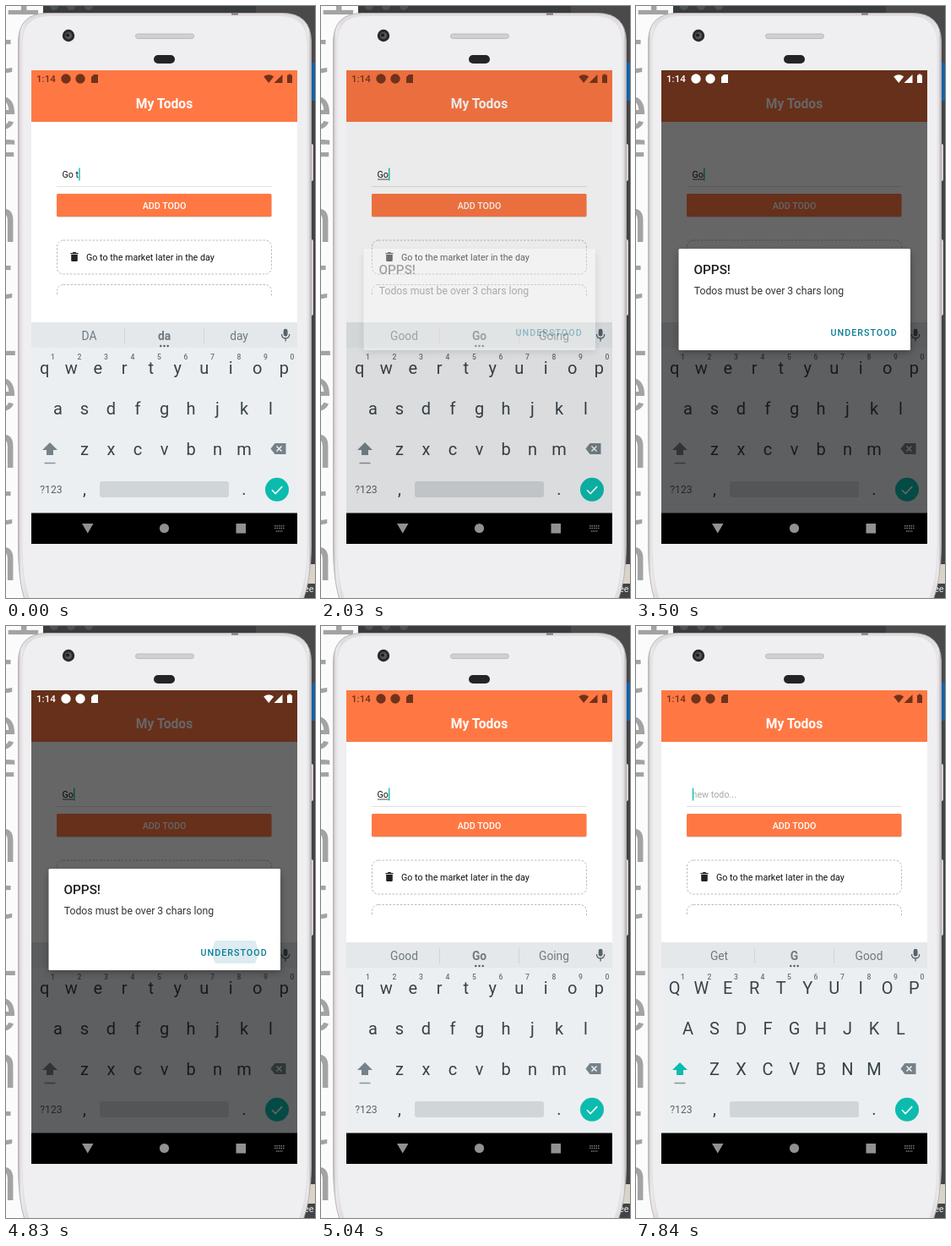
An HTML page for the animation above (8 s loop, 366 by 700 pixels).

```html
<!DOCTYPE html>
<html lang="en">
<head>
<meta charset="utf-8">
<title>My Todos</title>
<style>
  html, body { margin: 0; width: 100%; height: 100%; overflow: hidden; background: #fff; }
  svg { display: block; width: 366px; height: 700px; }
  text { font-family: Roboto, sans-serif; white-space: pre; }
  .mid { text-anchor: middle; }
  .med { font-weight: 500; }
  .bold { font-weight: 700; }
  .mono { font-family: "Liberation Mono", monospace; font-size: 74px; fill: #a3a3a3; text-anchor: end; }
  .key { font-size: 20px; fill: #37434a; }
  .hint { font-size: 8.6px; fill: #66737a; font-weight: 500; }
  .sug { font-size: 13.8px; fill: #70797e; }
</style>
</head>
<body>
<svg viewBox="0 0 366 700">
  <defs>
    <linearGradient id="rim">
      <stop offset="0" stop-color="#bdb7bc"/><stop offset=".01" stop-color="#ece9ec"/>
      <stop offset=".03" stop-color="#e0dce0"/><stop offset=".97" stop-color="#e0dce0"/>
      <stop offset=".99" stop-color="#ece9ec"/><stop offset="1" stop-color="#b3adb2"/>
    </linearGradient>
    <filter id="soft" x="-20%" y="-20%" width="140%" height="150%"><feGaussianBlur stdDeviation="5"/></filter>
    <clipPath id="list"><rect x="30" y="137" width="315" height="206"/></clipPath>
    <clipPath id="action"><rect x="227" y="372" width="87" height="27" rx="2"/></clipPath>
  </defs>

  <!-- desktop behind the phone -->
  <rect width="366" height="700" fill="#fbfbfb"/>
  <g id="letters"></g>
  <path d="M44 0H366V700H340V60H44Z" fill="#424345"/>
  <rect x="44" width="252" height="14" fill="#3a3b3d"/>
  <g fill="#505153"><circle cx="57" cy="0" r="5"/><circle cx="77" cy="0" r="5"/><circle cx="98" cy="0" r="5"/></g>
  <rect x="296" width="70" height="67" fill="#4a4a4b"/>
  <rect x="355" y="67" width="11" height="45" fill="#1762a3"/>
  <rect x="355" y="660" width="11" height="23" fill="#d9d3c8"/>
  <text x="353" y="693" font-size="11" fill="#e8e8e8">ee</text>
  <g fill="#d6d1d5"><rect x="360" y="163" width="4" height="44" rx="2"/><rect x="360" y="276" width="4" height="90" rx="2"/></g>

  <!-- phone -->
  <path d="M14.500 42Q15 8.500 49 8.500H327Q361 8.500 361.500 42V640Q361 678 352 702H22Q14.500 678 14.500 640Z" fill="url(#rim)" stroke="#bab4b9"/>
  <path d="M19 45Q19 11.500 52 11.500H324Q357 11.500 357 45V640Q357 678 347 702H28Q19 678 19 640Z" fill="#efeff1" stroke="#e2dfe2"/>
  <path d="M267 9.500h8" stroke="#777176" stroke-width="2"/>
  <circle cx="74" cy="35" r="7.200" fill="#29292b"/><circle cx="74" cy="35" r="4" fill="#55565a"/><circle cx="73" cy="34.500" r="2" fill="#1a1a1c"/>
  <rect x="153.500" y="33" width="69" height="5.500" rx="2.700" fill="#d0d0d2" stroke="#bcbcbf"/>
  <rect x="175" y="58" width="25" height="10" rx="5" fill="#242426"/>

  <!-- app -->
  <rect x="30" y="76" width="315" height="560" fill="#fff"/>
  <rect x="30" y="76" width="315" height="61" fill="#ff7843"/>
  <text class="mid bold" x="187.500" y="121.200" font-size="15.600" fill="#fff">My Todos</text>
  <text id="hintText" x="66.500" y="203" font-size="10.720" fill="#a8a8a8">new todo...</text>
  <text id="entry" x="66.500" y="203" font-size="10.720" fill="#111"></text>
  <path id="under" stroke="#222" stroke-width=".8"/>
  <rect id="caret" y="191.500" width="1.500" height="15" fill="#1fc4b2"/>
  <path d="M60 213.500H314.500" stroke="#e0e0e0"/>
  <rect x="60" y="223" width="254.500" height="27" rx="2" fill="#000" opacity=".14"/>
  <rect x="60" y="222" width="254.500" height="27" rx="1.500" fill="#ff7843"/>
  <rect id="press" x="60" y="222" width="254.500" height="27" rx="1.500" fill="#000"/>
  <text class="mid med" x="187.500" y="240" font-size="10.720" fill="#fff">ADD TODO</text>
  <g clip-path="url(#list)" fill="none" stroke="#b9b9b9" stroke-dasharray="2.500 1.800">
    <rect x="60.500" y="277" width="254" height="40" rx="7.500"/>
    <rect x="60.500" y="329.500" width="254" height="40" rx="7.500"/>
  </g>
  <path d="M77.200 294h7.600v6.800q0 1.200-1.200 1.200h-5.200q-1.200 0-1.200-1.200zM76.400 292h2.400l.8-.9h2.800l.8.9h2.400v1.200h-9.200z" fill="#222"/>
  <text x="95" y="300.800" font-size="10.720" fill="#111">Go to the market later in the day</text>

  <!-- keyboard -->
  <rect x="30" y="374" width="315" height="226" fill="#eceff1"/>
  <rect x="30" y="374" width="315" height="30" fill="#e4e8ea"/>
  <path d="M140.500 381v18M234.500 381v18" stroke="#d0d5d8"/>
  <g id="sugs"></g>
  <g fill="#4f5a60"><circle cx="183.300" cy="402" r="1.200"/><circle cx="187.500" cy="402" r="1.200"/><circle cx="191.700" cy="402" r="1.200"/></g>
  <g fill="none" stroke="#56626a" stroke-width="1.300">
    <rect x="329.300" y="382.500" width="3.600" height="7.500" rx="1.800" fill="#56626a"/>
    <path d="M326.500 388q0 5 4.600 5t4.600-5M331.100 393v3.500"/>
  </g>
  <g id="keys"></g>
  <path id="shift" d="M52 516l9 9h-5v6h-8v-6h-5z"/>
  <path d="M45.500 540.500h13" stroke="#8a979d" stroke-width="1.600"/>
  <path d="M313.500 523.500l5-6.500h13v13h-13z" fill="#758289"/>
  <path d="M320.500 520.500l6 6m0-6l-6 6" stroke="#eceff1" stroke-width="1.500"/>
  <text class="mid" x="53.500" y="576" font-size="12.200" fill="#55626a">?123</text>
  <text class="mid key" x="93" y="578">,</text>
  <text class="mid key" x="282" y="578">.</text>
  <rect x="111" y="562" width="153" height="19" rx="3" fill="#d0d5d8"/>
  <circle cx="321" cy="571.800" r="14" fill="#0bbcae"/>
  <path d="M315 572.300l4.200 4.200 8-8.400" fill="none" stroke="#fff" stroke-width="1.600"/>

  <!-- dialog -->
  <rect id="dim" x="30" y="76" width="315" height="524" fill="#000"/>
  <g id="dialog">
    <rect x="51" y="292" width="274" height="117" rx="2" fill="#000" opacity=".32" filter="url(#soft)"/>
    <rect x="50.500" y="287" width="274.500" height="120" rx="1.500" fill="#fff"/>
    <circle id="ripple" cx="271.500" cy="385.500" fill="#dcecf0" clip-path="url(#action)"/>
    <text class="med" x="68.500" y="317" font-size="15.300" fill="#1d1d1d">OPPS!</text>
    <text x="68.700" y="340.500" font-size="12.260" fill="#333">Todos must be over 3 chars long</text>
    <text class="med" x="230.500" y="389.600" font-size="10.720" letter-spacing="1.020" fill="#0b7d95">UNDERSTOOD</text>
  </g>

  <!-- status bar -->
  <g id="status">
    <text class="med" x="36" y="90" font-size="11.600">1:14</text>
    <circle cx="71" cy="86" r="5.700"/><circle cx="88" cy="86" r="5.700"/>
    <path d="M104 81h5v10h-8v-7z"/>
    <path d="M305.200 83.500q6-4.600 12 0l-6 7.500z"/>
    <path d="M327.500 81v10h-10z"/>
    <path d="M334.600 80.500h2.800v1.200h1.600v9.300h-6v-9.300h1.600z"/>
  </g>

  <!-- navigation bar -->
  <rect x="30" y="599.500" width="315" height="36.500" fill="#000"/>
  <g fill="#919191">
    <path d="M90 612h13.500l-6.750 11.500z"/><circle cx="187.500" cy="617.500" r="5.600"/>
    <rect x="272.500" y="612" width="11.500" height="11.500"/>
  </g>
  <path d="M318 614.700h12M318 617.500h12M320 621h8" stroke="#7a7a7a" stroke-width="1.500" stroke-dasharray="1.500 1"/>
</svg>
<script>
const $ = id => document.getElementById(id);
const set = (el, attrs) => { for (const k in attrs) el.setAttribute(k, attrs[k]); };

function label(parent, x, y, cls, str) {
  const el = document.createElementNS("http://www.w3.org/2000/svg", "text");
  set(el, { x, y, class: cls });
  el.textContent = str;
  parent.append(el);
  return el;
}

[..."tefntlenth"].forEach((c, i) => label($("letters"), 15, 79 + 66.7 * i, "mono", c));
label($("letters"), 42, 10, "mono", "ni");

const sugs = [98.5, 187.5, 276].map((x, i) =>
  label($("sugs"), x, 394.8, "sug mid" + (i === 1 ? " bold" : ""), ""));
const keys = [];
[["qwertyuiop", 45.75, 435], ["asdfghjkl", 61.5, 483], ["zxcvbnm", 93, 531]].forEach(([row, x, y]) =>
  [...row].forEach((c, i) => keys.push(label($("keys"), x + 31.5 * i, y, "key mid", c))));
[..."1234567890"].forEach((c, i) => label($("keys"), 55.5 + 31.5 * i, 417.5, "hint mid", c));

const LOOP = 8000, TICK = 70, LAST = 7840;

// [time, value] steps
const typed = [[0, "Go t"], [280, "Go "], [490, "Go"], [7350, "G"], [7770, ""]];
const offered = [[0, "DA da day"], [70, "the t to"], [560, "Good Go Going"], [7490, "Get G Good"]];
const caretOn = [[0, 1], [1050, 0], [1610, 1], [5460, 0], [6020, 1], [6510, 0], [7070, 1]];
const caps = [[0, 0], [7840, 1]];

// [time, value] points joined by straight lines
const dim = [[1960, 0], [2030, .08], [2100, .4], [2170, .6], [4900, .6], [4970, .31], [5040, 0]];
const fade = [[1960, 0], [2030, .35], [2100, .85], [2170, 1], [4900, 1], [4970, .12], [5040, 0]];
const press = [[1540, 0], [1750, .07], [2030, 0]];
const ripple = [[4760, 0], [4830, 27], [4970, 34], [5040, 34], [5041, 0]];
const light = [[2030, 0], [2100, 1], [4900, 1], [4970, .4], [5040, 0]];

const caretX = { "Go t": 86.2, "Go ": 83, "Go": 80, "G": 73.6, "": 66.8 };

function step(table, t) {
  let value = table[0][1];
  for (const [at, v] of table) if (t >= at) value = v;
  return value;
}

function tween(table, t) {
  const i = table.findIndex(p => p[0] > t);
  if (i === 0) return table[0][1];
  if (i < 0) return table[table.length - 1][1];
  const [t0, a] = table[i - 1], [t1, b] = table[i];
  return a + (b - a) * (t - t0) / (t1 - t0);
}

const mix = (a, b, k) => a.map((v, i) => Math.round(v + (b[i] - v) * k));

function draw(t) {
  const word = step(typed, t), upper = step(caps, t);
  const x = caretX[word];
  $("entry").textContent = word;
  set($("hintText"), { opacity: word ? 0 : 1 });
  set($("under"), { d: word === "Go" || word === "G" ? `M67 205H${x}` : "" });
  set($("caret"), { x, opacity: step(caretOn, t) });

  step(offered, t).split(" ").forEach((s, i) => sugs[i].textContent = s);
  keys.forEach(k => {
    const c = k.textContent;
    k.textContent = upper ? c.toUpperCase() : c.toLowerCase();
  });
  set($("shift"), { fill: upper ? "#0bbcae" : "#758289" });

  set($("press"), { opacity: tween(press, t) });
  set($("dim"), { opacity: tween(dim, t) });
  set($("dialog"), { opacity: tween(fade, t) });
  set($("ripple"), { r: tween(ripple, t) });
  set($("status"), { fill: `rgb(${mix([112, 50, 27], [255, 255, 255], tween(light, t))})` });
}

const start = performance.now();
function frame() {
  const t = (performance.now() - start) % LOOP;
  draw(Math.min(LAST, Math.floor(t / TICK) * TICK));
  requestAnimationFrame(frame);
}
frame();
</script>
</body>
</html>
```
